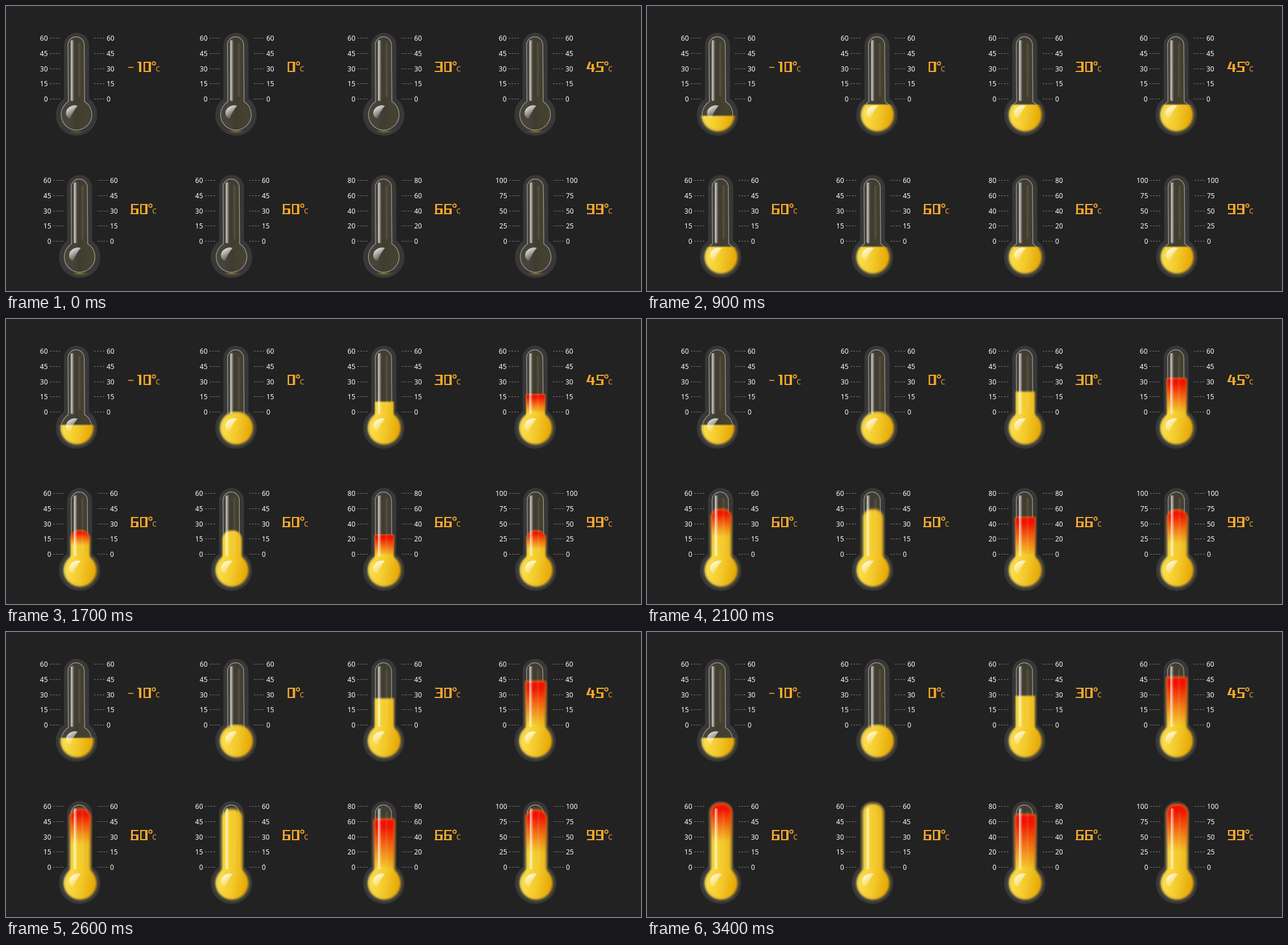
These frames come from a looping animation (1117x501 px, 3500 ms). An HTML page with a canvas:

```html
<!DOCTYPE html>
<html lang="en">
<head>
<meta charset="utf-8">
<title>Thermometers</title>
<style>
html, body { margin: 0; width: 100%; height: 100%; overflow: hidden; background: #222; }
canvas { display: block; }
</style>
</head>
<body>
<canvas id="stage" width="1117" height="501"></canvas>
<script>
const ctx = document.getElementById('stage').getContext('2d');
const LOOP = 3500, STEP = 100;
const ORANGE = '#f7a82c';
const FONT = '"Noto Sans", "Open Sans", sans-serif';
const BULB_BOTTOM = 31.5, STEM_BASE = -24;

// x: bulb centre, right: right edge of the digits, heat: gradient share from red to yellow
const meters = [
  { x: 124,   row: 0, max: 60,  value: '-10', right: 256,   bulb: 36.5, stem: 0 },
  { x: 404.5, row: 0, max: 60,  value: '0',   right: 509.5, bulb: 61, stem: 0 },
  { x: 664.5, row: 0, max: 60,  value: '30',  right: 785,   bulb: 61, stem: 55 },
  { x: 930.7, row: 0, max: 60,  value: '45',  right: 1052,  bulb: 61, stem: 87.5, heat: 0.95 },
  { x: 129.5, row: 1, max: 60,  value: '60',  right: 250,   bulb: 61, stem: 115, heat: 0.58, round: true },
  { x: 396.7, row: 1, max: 60,  value: '60',  right: 517,   bulb: 61, stem: 115, round: true },
  { x: 664.5, row: 1, max: 80,  value: '66',  right: 785,   bulb: 61, stem: 96, heat: 1 },
  { x: 931.7, row: 1, max: 100, value: '99',  right: 1052,  bulb: 61, stem: 113.5, heat: 0.72, round: true }
];

const bar = (x, y, w, h) => `M${x} ${y}h${w}v${h}h${-w}z`;
const glyphs = {
  '-': bar(6, 9, 9, 1.5),
  '0': bar(1, 0, 13, 2) + bar(1, 0, 2.5, 18) + bar(10, 0, 4, 18) + bar(1, 16, 13, 2),
  '1': bar(6, 0, 4, 2) + bar(9, 0, 4, 18),
  '3': bar(1, 0, 13, 2) + bar(3, 8, 11, 2) + bar(0, 16, 14, 2) + bar(10, 0, 4, 18),
  '4': 'M4.5 0h3.5l-4 12h-4z' + bar(0, 11, 15, 2) + bar(9, 4, 4, 14),
  '5': bar(2, 0, 13, 2) + bar(2, 0, 3, 10) + bar(2, 8, 12, 2) + bar(10, 8, 4, 10) + bar(0, 16, 14, 2),
  '6': bar(2, 0, 12, 2) + bar(1, 0, 3, 18) + bar(1, 8, 13, 2) + bar(10, 8, 4, 10) + bar(0, 16, 14, 2),
  '9': bar(1, 0, 13, 2) + bar(1, 0, 2.5, 10) + bar(1, 8, 13, 2) + bar(10, 0, 4, 18) + bar(1, 16, 13, 2)
};
for (const k in glyphs) glyphs[k] = new Path2D(glyphs[k]);

// cubic-bezier(.25, .1, .25, 1)
function ease(x) {
  if (x <= 0) return 0;
  if (x >= 1) return 1;
  const bez = (s, a, b) => 3 * a * s * (1 - s) ** 2 + 3 * b * s * s * (1 - s) + s ** 3;
  let lo = 0, hi = 1;
  for (let i = 0; i < 24; i++) {
    const mid = (lo + hi) / 2;
    if (bez(mid, 0.25, 0.25) < x) lo = mid; else hi = mid;
  }
  return bez(lo, 0.1, 1);
}

function gradient(x0, y0, x1, y1, ...stops) {
  const g = ctx.createLinearGradient(x0, y0, x1, y1);
  for (const [at, color] of stops) g.addColorStop(at, color);
  return g;
}

function fillRound(x, y, w, h, r, style) {
  ctx.beginPath();
  ctx.roundRect(x, y, w, h, r);
  ctx.fillStyle = style;
  ctx.fill();
}

// Draws only what lies below y, with a half-transparent strip along the edge.
function below(y, draw) {
  for (const [dy, height, alpha] of [[-0.8, 1.6, 0.5], [0.8, 100, 1]]) {
    ctx.save();
    ctx.beginPath();
    ctx.rect(-45, y + dy, 90, height);
    ctx.clip();
    ctx.globalAlpha = alpha;
    draw();
    ctx.restore();
  }
}

function glass() {
  fillRound(-22, -144, 44, 140, 22, '#383838');
  ctx.beginPath();
  ctx.arc(0, 0.5, 36.5, 0, 7);
  ctx.fill();

  const a = Math.asin(14.3 / 27);
  ctx.beginPath();
  ctx.arc(-0.7, -122.5, 14.3, Math.PI, 0);
  ctx.arc(0, 0, 27, a - Math.PI / 2, Math.PI * 1.5 - a);
  ctx.closePath();
  ctx.fillStyle = gradient(-27, 0, 27, 0, [0, '#4a4636'], [0.3, '#45423a'], [0.5, '#403c2f'], [0.75, '#454132'], [1, '#464232']);
  ctx.fill();
  ctx.strokeStyle = '#a19e95';
  ctx.lineWidth = 1.2;
  ctx.stroke();
}

function stemLiquid(m, h) {
  if (h < 0.5) return;
  const top = STEM_BASE - h;
  const half = 16 + h * 0.02;
  const radii = m.round ? [15, 15, 0, 0] : 0;
  const column = style => fillRound(1 - half, top, half * 2, h + 8, radii, style);
  ctx.save();
  ctx.filter = `blur(${0.8 + h * 0.014}px)`;
  column(gradient(-16, 0, 18, 0, [0, '#fadb3f'], [0.5, '#f4cb2c'], [1, '#edb81c']));
  if (m.heat) {
    column(gradient(0, top, 0, top + h * m.heat,
      [0, '#f20d00'], [0.16, '#f01400'], [1, 'rgba(240,50,0,0)']));
  }
  ctx.restore();
}

function bulbLiquid(h) {
  below(BULB_BOTTOM - h, () => {
    ctx.filter = 'blur(2px)';
    ctx.beginPath();
    ctx.arc(1, 0.5, 29, 0, 7);
    ctx.fillStyle = gradient(-28, -4, 30, 4, [0, '#ffe351'], [0.5, '#f3ca2c'], [1, '#e5a400']);
    ctx.fill();
  });
}

function shine() {
  fillRound(-10.5, -131, 6.5, 107, 3, gradient(-10.5, 0, -4, 0,
    [0, 'rgba(255,255,255,.35)'], [0.25, 'rgba(255,255,255,.7)'], [1, 'rgba(255,255,255,0)']));
  fillRound(3, -126, 4, 95, 2, 'rgba(255,255,255,.08)');
  ctx.beginPath();
  ctx.moveTo(-11, 7);
  ctx.bezierCurveTo(-18, 6, -21, -4, -16, -10);
  ctx.bezierCurveTo(-11, -16, -3, -18, 2, -15.5);
  ctx.bezierCurveTo(-4, -9, -8, -1, -11, 7);
  ctx.fillStyle = gradient(-15, -13, -5, 3, [0, 'rgba(255,255,255,.85)'], [1, 'rgba(255,255,255,.12)']);
  ctx.fill();
}

function scale(m) {
  ctx.font = `500 12px ${FONT}`;
  for (let i = 0; i <= 4; i++) {
    const y = -134.5 + i * 26.75;
    const label = String(m.max * (1 - i / 4));
    ctx.fillStyle = '#fff';
    ctx.textAlign = 'right';
    ctx.fillText(label, -50.5, Math.round(y + 4.5));
    ctx.textAlign = 'left';
    ctx.fillText(label, 53, Math.round(y + 4.5));
    ctx.fillStyle = '#777';
    for (let d = 0; d < 4; d++) {
      ctx.fillRect(-47 + d * 5, Math.round(y - 0.5), 3, 1);
      ctx.fillRect(31 + d * 5, Math.round(y - 0.5), 3, 1);
    }
  }
}

function reading(m) {
  ctx.save();
  ctx.translate(m.right, 98 + m.row * 250);
  ctx.fillStyle = ctx.strokeStyle = ORANGE;
  ctx.beginPath();
  ctx.arc(4, 3, 2.8, 0, 7);
  ctx.lineWidth = 1.8;
  ctx.stroke();
  ctx.font = `12px ${FONT}`;
  ctx.textAlign = 'left';
  ctx.fillText('C', 7.3, 17);
  ctx.translate(-15 - 16 * (m.value.length - 1), 0);
  for (const ch of m.value) {
    ctx.fill(glyphs[ch]);
    ctx.translate(16, 0);
  }
  ctx.restore();
}

function render(t) {
  const bulb = ease((t + 120) / 2000);
  const stem = ease((t - 1165) / 2200);
  ctx.fillStyle = '#222';
  ctx.fillRect(0, 0, 1117, 501);
  for (const m of meters) {
    ctx.save();
    ctx.translate(m.x, 191 + m.row * 250);
    glass();
    stemLiquid(m, m.stem * stem);
    bulbLiquid(m.bulb * bulb);
    shine();
    ctx.restore();
    ctx.save();
    ctx.translate(Math.round(m.x), 191 + m.row * 250);
    scale(m);
    ctx.restore();
    reading(m);
  }
}

const start = performance.now();
let shown = -1;
function tick() {
  const t = Math.floor(((performance.now() - start) % LOOP) / STEP) * STEP;
  if (t !== shown) render(shown = t);
  requestAnimationFrame(tick);
}
tick();
</script>
</body>
</html>
```
